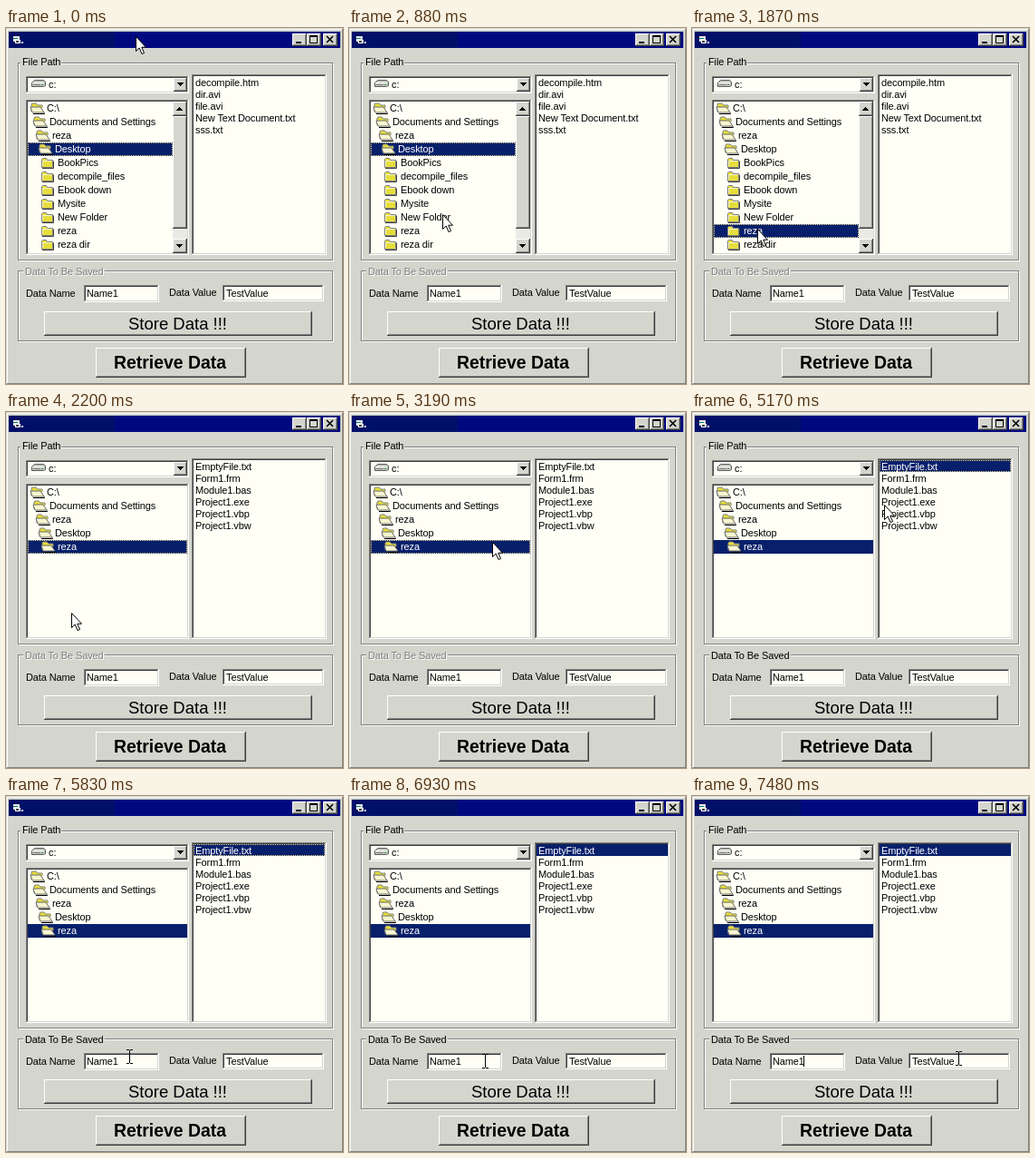
An HTML page for the animation above (8000 ms loop, 372 by 392 pixels).

```html
<!DOCTYPE html>
<html lang="en">
<head>
<meta charset="utf-8">
<title>File data form</title>
<style>
html, body { margin: 0; width: 100%; height: 100%; overflow: hidden; background: #d4d5cd; }
svg { display: block; width: 372px; height: 392px; }
text { font: 11px "Liberation Sans", Arial, sans-serif; letter-spacing: -0.12px; white-space: pre; }
text.store { font-size: 18.5px; letter-spacing: 0; }
text.retrieve { font-size: 19.4px; font-weight: bold; letter-spacing: 0; }
rect, .crisp { shape-rendering: crispEdges; }
</style>
</head>
<body>
<svg id="stage" viewBox="0 0 372 392" xmlns="http://www.w3.org/2000/svg"></svg>
<script>
const LOOP = 8000, STEP = 110;
const FACE = '#d4d5cd', SHADOW = '#808080', DARK = '#404040', WHITE = '#ffffff', PAPER = '#fffff6';
const NAVY = '#08206b', YELLOW = '#e6de3c', PALE = '#f8f6d0';
const stage = document.getElementById('stage');
let layer = stage;

function add(tag, attrs, content) {
  const node = document.createElementNS(stage.namespaceURI, tag);
  for (const key in attrs) node.setAttribute(key, attrs[key]);
  if (content) node.textContent = content;
  layer.appendChild(node);
  return node;
}

function group(draw) {
  const outer = layer;
  const node = add('g', {});
  layer = node;
  draw();
  layer = outer;
  return node;
}

const rect = (x, y, width, height, fill) => add('rect', { x, y, width, height, fill });
const path = (d, fill, stroke = 'none', extra = {}) => add('path', { d, fill, stroke, ...extra });
const text = (x, y, str, fill = '#000', extra = {}) => add('text', { x, y, fill, ...extra }, str);

function edges(x, y, w, h, light, dark) {
  rect(x, y, w, 1, light);
  rect(x, y, 1, h, light);
  rect(x, y + h - 1, w, 1, dark);
  rect(x + w - 1, y, 1, h, dark);
}

function raised(x, y, w, h) {
  rect(x, y, w, h, FACE);
  edges(x, y, w, h, WHITE, DARK);
  edges(x + 1, y + 1, w - 2, h - 2, FACE, SHADOW);
}

function sunken(x, y, w, h) {
  rect(x, y, w, h, PAPER);
  edges(x, y, w, h, SHADOW, WHITE);
  edges(x + 1, y + 1, w - 2, h - 2, DARK, FACE);
}

function etched(x, y, w, h, gapX, gapW) {
  edges(x + 1, y + 1, w, h, WHITE, WHITE);
  edges(x, y, w, h, SHADOW, SHADOW);
  rect(gapX, y - 1, gapW, 4, FACE);
}

function focusBox(x, y, w, h) {
  return add('rect', { x: x + .5, y: y + .5, width: w - 1, height: h - 1, fill: 'none',
    stroke: '#f0dc90', 'stroke-dasharray': '1 1', 'stroke-dashoffset': .5 });
}

function arrowGlyph(x, y, dir) {
  for (let i = 0; i < 4; i++) rect(x + i, dir > 0 ? y + i : y + 3 - i, 7 - 2 * i, 1, '#000');
}

function openFolder(x, y) {
  path(`M${x + 1} ${y + 11}V${y + 3}l1-1h4l2 2h5v3`, YELLOW, SHADOW);
  path(`M${x + 2} ${y + 12}l-2-6h11l4 6z`, PALE, '#686868');
  path(`M${x + 3} ${y + 13.5}h12.5v-1`, 'none', '#000');
}

function closedFolder(x, y) {
  path(`M${x + .5} ${y + 12.5}v-9l1-1h4l1 2h6v8z`, YELLOW, SHADOW);
  path(`M${x + 1.5} ${y + 11}v-5.5h10`, 'none', PALE);
  path(`M${x + 1} ${y + 13.5}h12.5v-8`, 'none', DARK);
}

function dirRow(i, name, folder, selected, width) {
  const y = 81 + 15 * i, x = 27 + 3 * Math.min(i, 4);
  if (selected) rect(24, y, width, 15, NAVY);
  folder(x, y);
  text(x + 18, y + 11, name, selected ? WHITE : '#000');
}

const PARENTS = ['C:\\', 'Documents and Settings', 'reza', 'Desktop'];
const CHILDREN = ['BookPics', 'decompile_files', 'Ebook down', 'Mysite',
  'New Folder', 'reza', 'reza dir', ''];

function desktopTree(selected) {
  [...PARENTS, ...CHILDREN].forEach((name, i) =>
    dirRow(i, name, i < PARENTS.length ? openFolder : closedFolder, i === selected, 160));
  focusBox(24, 81 + 15 * selected, 160, 15);
}

function scrollbar() {
  rect(184, 81, 16, 167, '#ebebe6');
  raised(184, 81, 16, 16);
  raised(184, 97, 16, 124);
  raised(184, 232, 16, 16);
  arrowGlyph(188, 87, -1);
  arrowGlyph(188, 238, 1);
}

function fileList(names, selected) {
  if (selected === 0) rect(207, 53, 145, 13, NAVY);
  names.forEach((name, i) => text(209, 64 + 13 * i, name, i === selected ? WHITE : '#000'));
}

function titleBar() {
  rect(3, 4, 366, 18, '#000880');
  rect(3, 4, 117, 18, '#001068');
  // window icon
  rect(8, 9, 7, 6, '#e8e8e0');
  rect(8, 11, 5, 1, '#008080');
  rect(10, 13, 6, 4, WHITE);
  rect(11, 14, 3, 2, DARK);
  rect(17, 15, 2, 2, WHITE);
  [316, 332, 350].forEach(x => raised(x, 6, 16, 14));
  rect(320, 15, 6, 2, '#000');
  edges(335, 8, 9, 9, '#000', '#000');
  rect(335, 8, 9, 2, '#000');
  path('M354 9l7 7M361 9l-7 7', 'none', '#000', { 'stroke-width': 1.6 });
}

function driveIcon() {
  path('M28.5 60.5l3-3h10l2 2v4l-2 1h-13z', '#c8c8c4', '#585858');
  path('M29 60.5h13', 'none', WHITE);
  rect(30, 62, 8, 1, SHADOW);
  rect(39, 62, 2, 1, '#30a030');
}

// fixed parts of the form; the window reaches one pixel past the stage
rect(0, 0, 372, 392, FACE);
edges(0, 0, 373, 393, FACE, DARK);
edges(1, 1, 371, 391, WHITE, SHADOW);
titleBar();
etched(13, 38, 348, 218, 16, 45);
text(18, 41, 'File Path');
sunken(22, 53, 180, 19);
driveIcon();
text(47, 66, 'c:');
raised(185, 55, 15, 15);
arrowGlyph(189, 60, 1);
sunken(22, 79, 180, 171);
sunken(205, 51, 149, 199);
etched(13, 267, 348, 78, 19, 90);
text(22, 296, 'Data Name');
sunken(86, 283, 83, 19);
text(89, 296, 'Name1');
text(180, 295, 'Data Value');
sunken(239, 283, 112, 18);
text(243, 296, 'TestValue');
raised(42, 312, 296, 27);
text(189.5, 332, 'Store Data !!!', '#000', { class: 'store', 'text-anchor': 'middle' });
raised(99, 352, 166, 33);
text(181, 375, 'Retrieve Data', '#000', { class: 'retrieve', 'text-anchor': 'middle' });

// parts that change
const clip = add('clipPath', { id: 'tree' });
clip.appendChild(rect(24, 81, 176, 167, '#000'));
const tree = draw => {
  const node = group(draw);
  node.setAttribute('clip-path', 'url(#tree)');
  return node;
};
const FILES = ['EmptyFile.txt', 'Form1.frm', 'Module1.bas', 'Project1.exe', 'Project1.vbp', 'Project1.vbw'];

// each entry: node, time shown, time hidden
const parts = [
  [tree(() => desktopTree(3)), 0, 1870],
  [tree(() => desktopTree(9)), 1870, 2200],
  [group(scrollbar), 0, 2200],
  [tree(() => [...PARENTS, 'reza'].forEach((name, i) =>
    dirRow(i, name, openFolder, i === 4, 176))), 2200, LOOP],
  [focusBox(24, 141, 176, 15), 2200, 4180],
  [group(() => fileList(['decompile.htm', 'dir.avi', 'file.avi', 'New Text Document.txt', 'sss.txt'])), 0, 2200],
  [group(() => fileList(FILES)), 2200, 4180],
  [group(() => fileList(FILES, 0)), 4180, LOOP],
  [focusBox(207, 53, 145, 13), 4180, 6270],
  [group(() => {
    text(22, 273, 'Data To Be Saved', WHITE);
    text(21, 272, 'Data To Be Saved', SHADOW);
  }), 0, 4290],
  [text(21, 272, 'Data To Be Saved'), 4290, LOOP],
  [rect(123, 286, 1, 12, '#000'), 6270, 6930],
  [rect(123, 286, 1, 12, '#000'), 7370, LOOP]
];

const arrow = path('M.5.5V16.5L4.2 13 7 19.5 9.5 18.5 6.8 12.2H11.5Z', WHITE, '#000');
const beam = path('M0 .5h3M4 .5h3M3.5 1v14M0 15.5h3M4 15.5h3', 'none', '#000', { class: 'crisp' });

// pointer runs: start time, pointer shape and place for each step
const runs = [
  [0, [[arrow, 143, 9]]],
  [330, [[arrow, 150, 20], [arrow, 166, 50], [arrow, 182, 92], [arrow, 188, 134],
    [arrow, 150, 176], [arrow, 103, 205], [arrow, 84, 212], [arrow, 76, 214]]],
  [1210, [[arrow, 74, 218], [arrow, 72, 221]]],
  [2970, [[arrow, 98, 201], [arrow, 130, 171], [arrow, 158, 143], [arrow, 180, 113],
    [arrow, 199, 88], [arrow, 214, 69], [arrow, 221, 60]]],
  [5060, [[arrow, 219, 70], [arrow, 212, 102], [arrow, 200, 142], [arrow, 186, 181],
    [arrow, 170, 216], [arrow, 154, 247], [arrow, 143, 268], [beam, 133, 279]]],
  [6930, [[beam, 147, 284], [arrow, 178, 299], [arrow, 204, 298], [arrow, 230, 296],
    [beam, 268, 284], [beam, 291, 281]]]
];

function render(t) {
  for (const [node, from, to] of parts)
    node.setAttribute('visibility', t >= from && t < to ? 'visible' : 'hidden');
  const [start, steps] = runs.filter(run => run[0] <= t).pop();
  const [shape, x, y] = steps[Math.min(steps.length - 1, Math.floor((t - start) / STEP))];
  for (const p of [arrow, beam]) p.setAttribute('visibility', p === shape ? 'visible' : 'hidden');
  shape.setAttribute('transform', `translate(${x} ${y})`);
}

const begin = performance.now();
function tick() {
  render((performance.now() - begin) % LOOP);
  requestAnimationFrame(tick);
}
tick();
</script>
</body>
</html>
```
